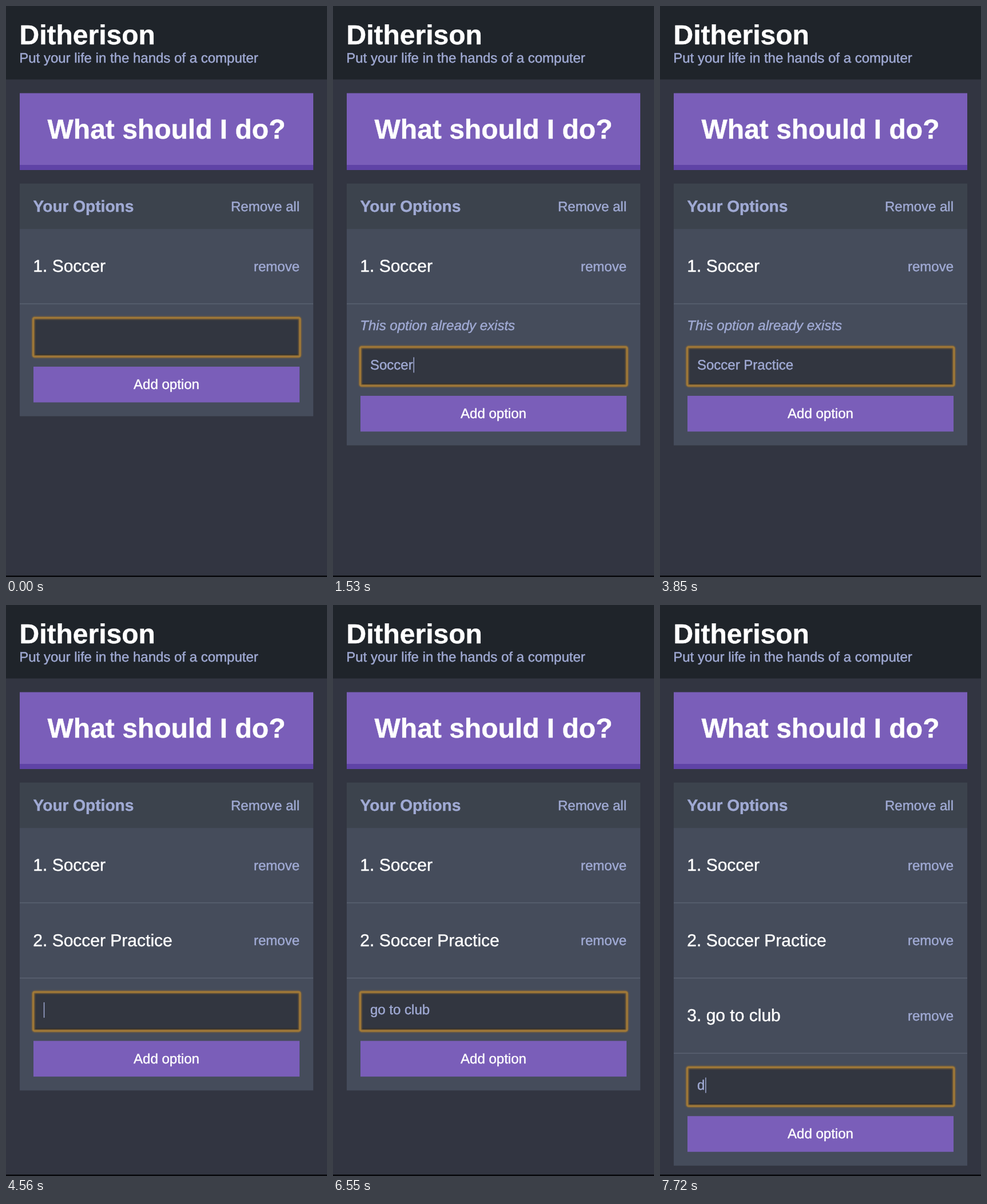
Write an HTML page that moves like this. It is 561 px wide and 999 px high and loops after 8 s.

```html
<!DOCTYPE html>
<html lang="en">
<head>
<meta charset="utf-8">
<title>Option picker</title>
<style>
  html, body { margin: 0; width: 100%; height: 100%; overflow: hidden; background: #323541; }
  svg { display: block; width: 100%; height: 100%; }
  text {
    font: 24px "Liberation Sans", Arial, sans-serif; white-space: pre;
    color: #a0aad4; fill: currentColor; stroke: currentColor; stroke-width: 0.45px;
    text-rendering: geometricPrecision;
  }
  .big { font-size: 48px; font-weight: 700; color: #fff; }
  .head { font-size: 28.08px; font-weight: 700; }
  .item { font-size: 30px; color: #fff; }
  .white { color: #fff; }
  .error { font-style: italic; }
  .end { text-anchor: end; }
  .mid { text-anchor: middle; }
  .purple { fill: #7a5eb9; }
  .line { fill: #5a6171; }
</style>
</head>
<body>
<svg viewBox="0 0 561 999" preserveAspectRatio="none">
  <defs>
    <filter id="soft" x="-5%" y="-20%" width="110%" height="140%">
      <feGaussianBlur stdDeviation="0.8"/>
    </filter>
  </defs>
  <rect width="561" height="999" fill="#323541"/>
  <rect width="561" height="128.5" fill="#1f242a"/>
  <text class="big" x="23.5" y="67">Ditherison</text>
  <text x="23.2" y="99">Put your life in the hands of a computer</text>

  <rect class="purple" x="24" y="152.5" width="513" height="126"/>
  <rect x="24" y="278" width="513" height="9" fill="#5f43a6"/>
  <text class="big mid" x="280.5" y="232">What should I do?</text>

  <rect id="panel" x="24" y="390" width="513" fill="#454c5b"/>
  <rect x="24" y="310.7" width="513" height="79.5" fill="#3c434d"/>
  <text class="head" x="47.6" y="360">Your Options</text>
  <text class="end" x="513" y="359">Remove all</text>
  <g id="rows"></g>
  <text id="error" class="error" x="47.3" y="567">This option already exists</text>

  <g id="form">
    <rect x="48" y="546" width="465.5" height="67" fill="#323640"/>
    <rect x="50" y="609" width="462" height="2" fill="#20242b"/>
    <rect x="47.7" y="545.7" width="466" height="67.6" rx="2.5" fill="none" stroke="#8c6a35" stroke-width="5" filter="url(#soft)"/>
    <rect x="47.5" y="545.5" width="466.4" height="68" rx="2.5" fill="none" stroke="#a27a38" stroke-width="2.6"/>
    <text id="field" x="65" y="584.8"></text>
    <rect id="caret" y="563.5" width="1.5" height="27" fill="#a0aad4"/>
    <rect class="purple" x="48" y="631" width="465" height="62.5"/>
    <text class="white mid" x="280.5" y="670">Add option</text>
  </g>
  <rect y="996.5" width="561" height="2.5" fill="#08090c"/>
</svg>
<script>
  const LOOP = 8000, ROW = 131.6, ERROR_H = 51;
  const items = ["Soccer", "Soccer Practice", "go to club"];

  // start ms, typed text, caret on, rows, error shown
  const steps = [
    [0, "", 0, 1, 0],
    [100, "S", 1, 1, 0],
    [260, "So", 1, 1, 0],
    [420, "Socc", 1, 1, 0],
    [580, "Socce", 1, 1, 0],
    [880, "Soccer", 1, 1, 0],
    [1030, "Soccer", 0, 1, 0],
    [1530, "Soccer", 1, 1, 1],
    [2030, "Soccer", 0, 1, 1],
    [2530, "Soccer P", 1, 1, 1],
    [2910, "Soccer Pra", 1, 1, 1],
    [3100, "Soccer Prac", 1, 1, 1],
    [3290, "Soccer Practi", 1, 1, 1],
    [3480, "Soccer Practic", 1, 1, 1],
    [3660, "Soccer Practice", 1, 1, 1],
    [3850, "Soccer Practice", 0, 1, 1],
    [4560, "", 1, 2, 0],
    [4710, "", 0, 2, 0],
    [5140, "g", 1, 2, 0],
    [5340, "go ", 1, 2, 0],
    [5540, "go to", 1, 2, 0],
    [5740, "go to c", 1, 2, 0],
    [5940, "go to cl", 1, 2, 0],
    [6140, "go to club", 1, 2, 0],
    [6550, "go to club", 0, 2, 0],
    [6780, "", 1, 3, 0],
    [7540, "", 0, 3, 0],
    [7720, "d", 1, 3, 0]
  ];

  const el = id => document.getElementById(id);
  const [panel, rows, error, form, field, caret] =
    ["panel", "rows", "error", "form", "field", "caret"].map(el);
  const show = (node, on) => node.setAttribute("visibility", on ? "visible" : "hidden");

  rows.innerHTML = items.map((name, i) => `<g transform="translate(0 ${i * ROW})">
    <text class="item" x="47.3" y="465">${i + 1}. ${name}</text>
    <text class="end" x="513" y="463.5">remove</text>
    <rect class="line" x="24" y="520.3" width="513" height="1.5"/></g>`).join("");

  function render([, typed, caretOn, count, errorOn]) {
    const shift = (count - 1) * ROW + errorOn * ERROR_H;
    panel.setAttribute("height", 327.7 + shift);
    form.setAttribute("transform", `translate(0 ${shift})`);
    [...rows.children].forEach((row, i) => show(row, i < count));
    show(error, errorOn);
    field.textContent = typed;
    caret.setAttribute("x", 65.8 + (typed ? field.getComputedTextLength() : 0));
    show(caret, caretOn);
  }

  let current;
  const origin = performance.now();
  function tick() {
    const t = (performance.now() - origin) % LOOP;
    const step = steps.findLast(s => s[0] <= t);
    if (step !== current) render(current = step);
    requestAnimationFrame(tick);
  }
  tick();
</script>
</body>
</html>
```
